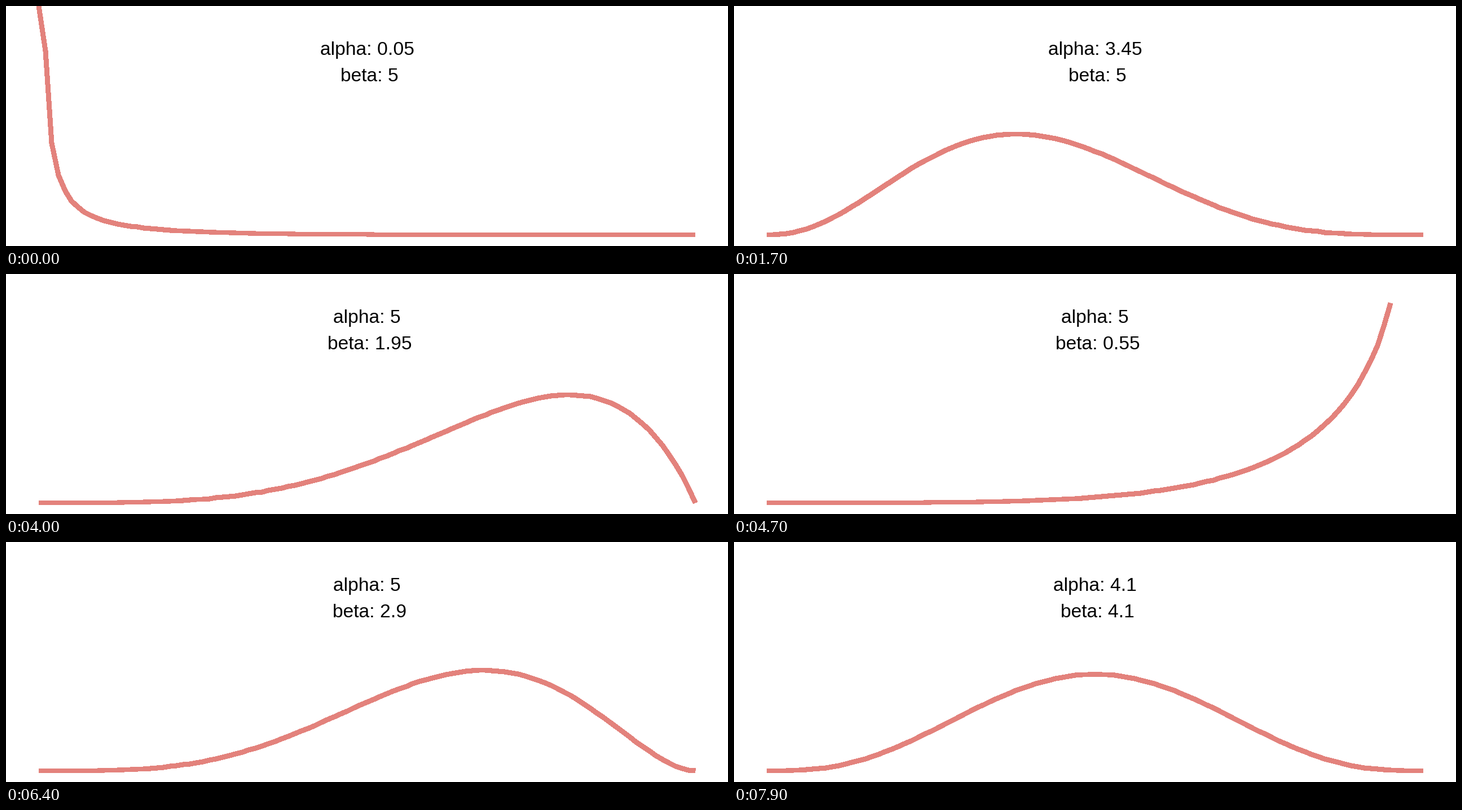
Write a matplotlib script that moves like this. It is 1280 px wide and 427 px high and loops after 8000 ms.

```python
import math

import matplotlib.pyplot as plt
import numpy as np
from matplotlib.animation import FuncAnimation

W, H, DPI = 1280, 427, 64          # a power of two keeps the pixel size exact
STEPS, INTERVAL = 80, 100
PX = 72 / DPI                      # points per pixel
LEFT, RIGHT = 58, 1222
BASE, UNIT, Y_MAX = 407, 77.45, 5  # baseline row, pixels per density unit
FONT_PX = 33.6

plt.rcParams["path.simplify"] = False
plt.rcParams["font.family"] = "Liberation Sans"

x = np.linspace(0, 1, 101)
x_px = np.rint(LEFT + (RIGHT - LEFT) * x)


def params(step):
    """Shape parameters: alpha rises, beta falls, beta rises, both fall."""
    k = 4 * step
    if k < 100:
        a, b = k + 1, 100
    elif k < 199:
        a, b = 100, 199 - k
    elif k < 299:
        a, b = 100, k - 198
    else:
        a = b = 398 - k
    return a / 20, b / 20


def beta_pdf(a, b):
    norm = math.exp(math.lgamma(a + b) - math.lgamma(a) - math.lgamma(b))
    with np.errstate(divide="ignore"):
        return norm * x ** (a - 1) * (1 - x) ** (b - 1)


def curve_px(a, b):
    d = beta_pdf(a, b)
    # Infinite density goes to the top edge, other overflow leaves a gap.
    d[np.isfinite(d) & (d > Y_MAX)] = np.nan
    return np.where(np.isinf(d), 0, np.rint(BASE - UNIT * d))


def text_left(prefix_em, number, centre):
    """Pen start that centres the label by its advance width."""
    em = prefix_em + sum(0.278 if c == "." else 0.556 for c in number)
    return centre - em * FONT_PX / 2


fig = plt.figure(figsize=(W / DPI, H / DPI), dpi=DPI, facecolor="white")
ax = fig.add_axes([0, 0, 1, 1])
ax.set_xlim(0, W)
ax.set_ylim(H, 0)
ax.axis("off")

line, = ax.plot([], [], color="#E3827C", lw=8 * PX, antialiased=False,
                solid_capstyle="butt", solid_joinstyle="round", snap=False)
style = dict(fontsize=FONT_PX * PX, color="black", ha="left", va="baseline")
alpha_text = ax.text(0, 87, "", **style)
beta_text = ax.text(0, 134, "", **style)


def draw(step):
    a, b = params(step)
    line.set_data(x_px, curve_px(a, b))
    a_num, b_num = f"{a:g}", f"{b:g}"
    alpha_text.set_text("alpha: " + a_num)
    alpha_text.set_x(text_left(3.002, a_num, 640))
    beta_text.set_text("beta: " + b_num)
    beta_text.set_x(text_left(2.502, b_num, 644.5))
    return line, alpha_text, beta_text


anim = FuncAnimation(fig, draw, frames=STEPS, interval=INTERVAL,
                     repeat=True, repeat_delay=0, blit=False)
plt.show()
```
